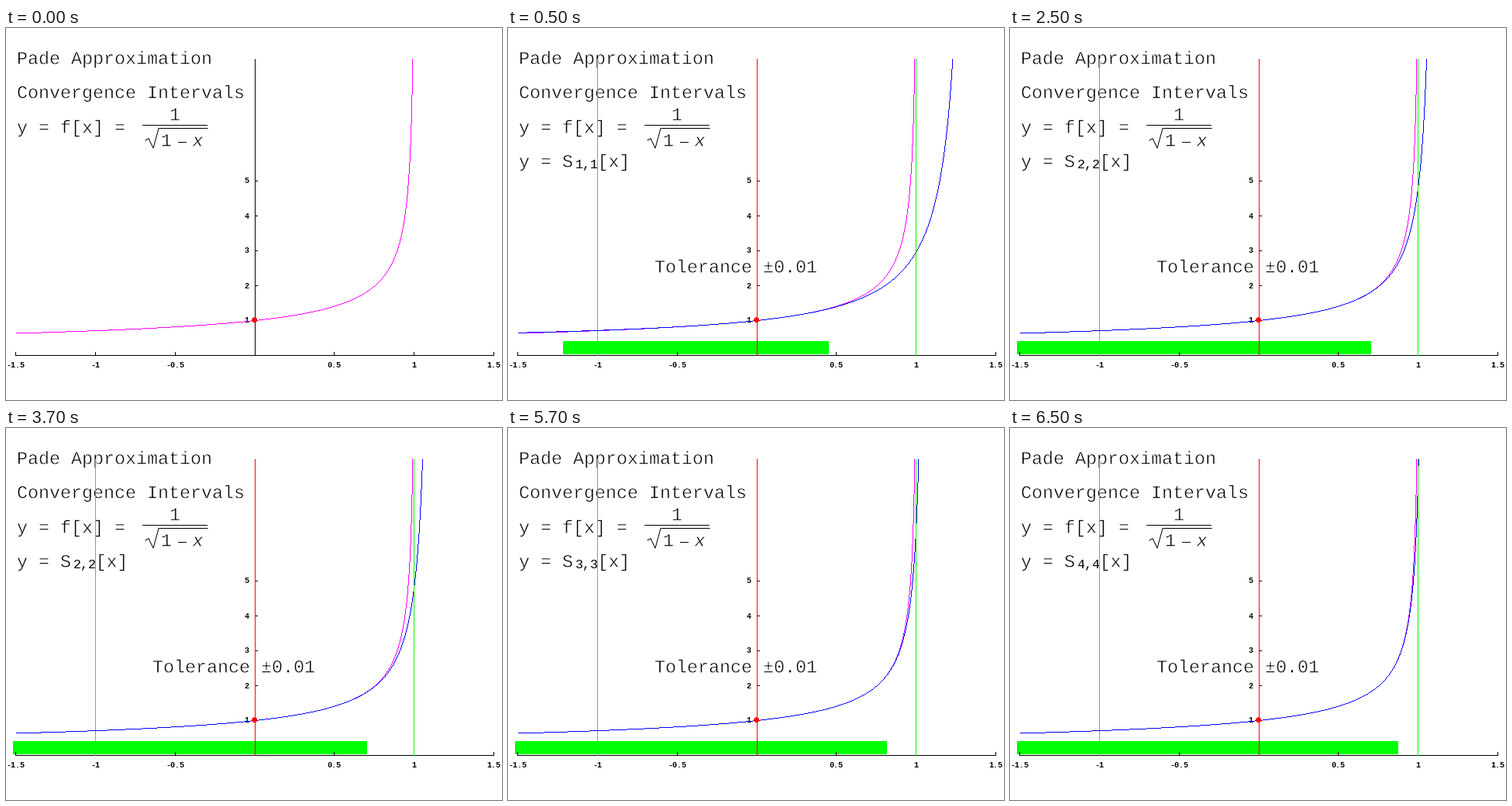
A matplotlib script for the animation above (8000 ms loop, 640 px wide and 480 px high).

```python
from math import comb

import matplotlib.pyplot as plt
import numpy as np
from matplotlib.animation import FuncAnimation
from matplotlib.patches import Circle, Rectangle
from matplotlib.patheffects import Stroke

W, H, DPI = 640, 480, 80
PT = 72 / DPI
TOP, AXIS_ROW = 40, 422
TOLERANCE = 0.01
GREEN, RED = "#00ff00", "#ff0000"
THIN = [Stroke(linewidth=0.5, foreground="white")]

fig = plt.figure(figsize=(W / DPI, H / DPI), dpi=DPI, facecolor="white")
ax = fig.add_axes([0, 0, 1, 1])
ax.set_xlim(0, W)
ax.set_ylim(H, 0)
ax.axis("off")


def px(x):
    return 321 + 205.67 * x


def py(y):
    return 422.4 - 45 * y


def f(x):
    return 1 / np.sqrt(1 - x)


def pade(n, x):
    """Diagonal [n/n] approximant of 1/sqrt(1-x) at 0."""
    u, m = 1 - x, 2 * n + 1
    top = sum(comb(m, 2 * k + 1) * u**k for k in range(n + 1))
    return top / sum(comb(m, 2 * k) * u**k for k in range(n + 1))


def box(x0, y0, x1, y1, color="black", z=5):
    patch = Rectangle((x0, y0), x1 - x0, y1 - y0, fc=color, lw=0,
                      antialiased=False, zorder=z)
    return ax.add_patch(patch)


def vline(x, color, z):
    col = int(px(x))
    return box(col, TOP, col + 1, AXIS_ROW + 1, color, z)


def write(x, y, text, size=23.33, **style):
    style = {"path_effects": THIN, "zorder": 3, "ha": "left", **style}
    return ax.text(x, y, text, fontfamily="Liberation Mono",
                   fontsize=size * PT, va="baseline", **style)


def label(x, y, text):
    write(x, y, text, 10, ha="center", weight="bold", path_effects=None)


def pixels(color, z):
    """One-pixel dots, for crisp hairlines without antialiasing."""
    return ax.plot([], [], ",", color=color, antialiased=False, zorder=z)[0]


def curve_pixels(func, x_max):
    """One pixel per column where the curve is flat, one per row where steep."""
    x = np.linspace(-1.5, x_max, 6001)
    ys = py(func(x))
    end = np.argmax(ys < TOP) + 1
    xs, ys = px(x[:end]), ys[:end]
    bend = np.argmax(-np.diff(ys) > np.diff(xs))
    cols = np.arange(12, int(xs[bend]) + 1) + 0.5
    rows = np.arange(TOP, int(ys[bend]) + 1) + 0.5
    return (np.append(cols, np.floor(np.interp(rows, ys[::-1], xs[::-1])) + 0.5),
            np.append(np.floor(np.interp(cols, xs, ys)) + 0.5, rows))


def tolerance_span(n):
    x = np.linspace(-1.5, 0.99, 5001)
    good = x[np.abs(f(x) - pade(n, x)) < TOLERANCE]
    return int(px(good[0])) - 3, round(px(good[-1])) - 2


# Axes
box(12, AXIS_ROW, 630, AXIS_ROW + 1)
vline(0, "black", 5)
for tick in (-1.5, -1, -0.5, 0.5, 1, 1.5):
    col = int(px(tick))
    box(col, 418, col + 1, AXIS_ROW)
    label(col + 0.5, 438.5, f"{tick:g}")
for tick in range(1, 6):
    row = int(py(tick))
    box(321, row, 325, row + 1)
    label(310.3, row + 3.5, str(tick))

# Titles and formula
write(14, 46.5, "Pade Approximation")
write(14, 90.5, "Convergence Intervals")
write(14, 135.5, "y = f[x] =")
write(218, 119, "1", ha="center")
box(176, 125, 260, 126)
ax.plot([180, 184, 190, 197, 260], [145, 142.5, 155, 129.5, 129.5],
        color="black", lw=PT, zorder=3)
write(207, 152.5, "1", ha="center")
box(222, 147, 233, 148)
write(247.5, 152.5, "x", ha="center", style="italic")

pixels("#ff00ff", 6).set_data(*curve_pixels(f, 0.99))
ax.add_patch(Circle((320.7, 376.7), 3.5, fc=RED, lw=0, zorder=10))

# Parts that belong to an approximation
bar = box(0, 404, 1, 421, GREEN, 4)
blue = pixels("#0000ff", 7)
subscript = write(86.5, 181.5, "", 16.7, path_effects=None)
overlay = [
    bar, blue, subscript,
    write(14, 179.5, "y = S"),
    write(115.5, 179.5, "[x]"),
    write(189, 315.5, "Tolerance ±0.01"),
    vline(-1, GREEN, 5.5),
    vline(0, RED, 5.5),
    vline(1, GREEN, 8),
]


def update(i):
    order = 0 if i == 0 else 1 + (i - 1) // 4
    for part in overlay:
        part.set_visible(order > 0)
    if order:
        left, right = tolerance_span(order)
        bar.set_x(left)
        bar.set_width(right - left)
        blue.set_data(*curve_pixels(lambda x: pade(order, x), 1.5))
        subscript.set_text(f"{order},{order}")
    return overlay


anim = FuncAnimation(fig, update, frames=16, interval=500, repeat=True,
                     repeat_delay=0, blit=False)
plt.show()
```
